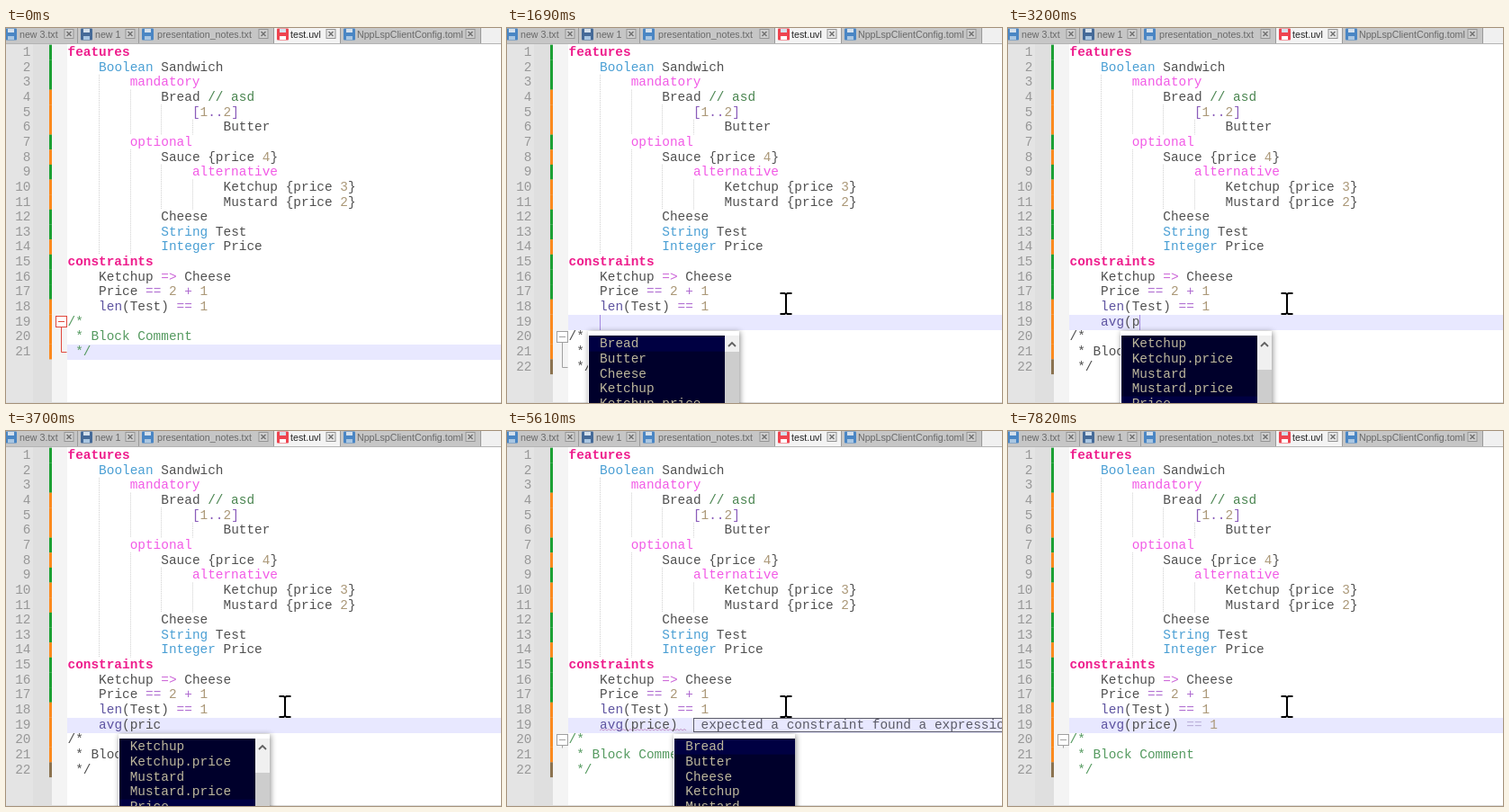
An HTML page for the animation above (8 s loop, 550 by 417 pixels).

```html
<!DOCTYPE html>
<html lang="en">
<head>
<meta charset="utf-8">
<title>Editor</title>
<style>
  html, body { margin: 0; width: 100%; height: 100%; overflow: hidden; background: #fff; }
  svg { display: block; width: 550px; height: 417px; }
  text { font: 14.42px "Liberation Mono", "Courier New", monospace; white-space: pre; }
  text.bold { font-weight: bold; }
  text.tab { font: 10.67px "Liberation Sans", Arial, sans-serif; }
  .popup { filter: drop-shadow(1px 1px 3px rgba(0, 0, 0, .45)); }
</style>
</head>
<body>
<svg id="stage" viewBox="0 0 550 417">
  <g id="base"></g>
  <g id="live"></g>
  <g id="mouse">
    <path d="M303.5 295h5l1.5 1.2 1.5-1.2h5M303.5 318h5l1.5-1.2 1.5 1.2h5M310 296v21" fill="none" stroke="#000" stroke-width="2"/>
  </g>
</svg>
<script>
const LOOP = 8000, CW = 8.65, LH = 16.65, LEFT = 68.5, TOP = 18.7;
const colX = c => LEFT + c * CW;
const rowY = n => TOP + (n - 1) * LH;
const rowTop = n => Math.ceil(rowY(n));

const rect = (x, y, w, h, fill, extra = '') =>
  `<rect x="${x}" y="${y}" width="${w}" height="${h}" fill="${fill}" ${extra}/>`;
const path = (d, stroke, w = 1) => `<path d="${d}" fill="none" stroke="${stroke}" stroke-width="${w}"/>`;
const text = (x, y, s, fill, extra = '') =>
  `<text x="${x}" y="${y}" fill="${fill}" ${extra}>${s.replace(/&/g, '&amp;').replace(/</g, '&lt;')}</text>`;

// Syntax rules: pattern, colour, bold
const PLAIN = '#505050';
const RULES = [
  [/^\/\/.*/, '#4a8550'],
  [/^(features|constraints)/, '#ee1c8c', true],
  [/^(Boolean|String|Integer)/, '#4a9fd4'],
  [/^(mandatory|optional|alternative)/, '#f25ae6'],
  [/^(len|avg)/, '#5e54a0'],
  [/^=>/, '#cc66d8'],
  [/^(==|\+)/, '#ae6ad0'],
  [/^(\[|\]|\.\.)/, '#8a5cba'],
  [/^\d+/, '#ab9878'],
  [/^(\w+|\s+|.)/, PLAIN]
];

function codeLine(n, src, equals) {
  let col = 0, out = '';
  while (col < src.length) {
    const rest = src.slice(col);
    const [re, fill, bold] = RULES.find(r => r[0].test(rest));
    const word = rest.match(re)[0];
    if (word.trim()) {
      const color = word === '==' && equals ? equals : fill;
      out += text(colX(col), rowY(n) + 12.3, word, color, bold ? 'class="bold"' : '');
    }
    col += word.length;
  }
  return out;
}

const CODE = `features
    Boolean Sandwich
        mandatory
            Bread // asd
                [1..2]
                    Butter
        optional
            Sauce {price 4}
                alternative
                    Ketchup {price 3}
                    Mustard {price 2}
            Cheese
            String Test
            Integer Price
constraints
    Ketchup => Cheese
    Price == 2 + 1
    len(Test) == 1`.split('\n');
const COMMENT = ['/*', ' * Block Comment', ' */'];

// Tabs: left edge, width, label x, label, icon colour, close x
const TABS = [
  [-4, 83, 15, 'new 3.txt', '#4a86c4', 70],
  [80, 67, 99, 'new 1', '#456a98', 138],
  [148, 149, 168, 'presentation_notes.txt', '#4a86c4', 286],
  [298, 73, 316, 'test.uvl', '#ee4450', 361],
  [372, 155, 390, 'NppLspClientConfig.toml', '#4a86c4', 516]
];

function tab([x, w, tx, label, color, cx]) {
  const on = label === 'test.uvl', ix = x + 3;
  return rect(x, 0, w, 17, on ? '#f3f3f3' : '#c6c6c6') +
    rect(x + w, 0, 1, 17, '#9a9a9a') +
    rect(ix, 0.5, 13, 13, color, 'rx="1"') + rect(ix + 3, 1, 7, 4, '#d4e0ec') +
    rect(ix + 3, 9, 7, 4, on ? '#fff' : '#a9c6e2') +
    text(tx, 11, label, on ? '#222' : '#686868', 'class="tab"') +
    rect(cx - 5, 1.5, 10, 10, on ? '#e8e8e8' : '#d0d0d0', 'stroke="#949494"') +
    path(`M${cx - 2.5} 4l5 5m0 -5l-5 5`, '#727272', 1.5);
}

// Indent guides: column, first line, last line
const GUIDES = [[4, 3, 14], [8, 4, 6], [8, 8, 14], [12, 5, 6], [12, 9, 11], [16, 6, 6], [16, 10, 11]];
const MARKS = 'gggooogogooggogggo';
const GREEN = '#1ca035', ORANGE = '#fb8a1e', OLIVE = '#8b7350';
const mark = (n, color) => rect(48, rowY(n), 3, LH + 0.1, color);
const lineNo = n => text(27.5, rowY(n) + 12.3, String(n), '#989898', 'text-anchor="end"');

function drawBase() {
  let s = rect(0, 0, 550, 417, '#fff') + rect(0, 0, 550, 17, '#f0f0f0');
  s += TABS.map(tab).join('') + rect(0, 17, 550, 1, '#b4b4b4');
  s += rect(0, 18, 30, 399, '#e4e4e4') + rect(30, 18, 21, 399, '#dfdfdf') + rect(51, 18, 17, 399, '#f4f4f4');
  for (const [c, a, b] of GUIDES) {
    const x = Math.round(colX(c)) + 0.5;
    s += `<path d="M${x} ${rowY(a)}V${rowY(b + 1)}" stroke="#d0d0d0" stroke-dasharray="1 1"/>`;
  }
  CODE.forEach((_, i) => s += lineNo(i + 1) + mark(i + 1, MARKS[i] === 'g' ? GREEN : ORANGE));
  return s + rect(0, 416, 550, 1, '#dcdcdc');
}

const UNRES = 'unresolved reference';
const EXPECT = 'expected a constraint found a expression';
const MISSING = 'missing lhs or rhs expression';
const WORDS = ['Bread', 'Butter', 'Cheese', 'Ketchup', 'Ketchup.price', 'Mustard', 'Mustard.price', 'Price'];
const NAMES = WORDS.filter(w => !w.includes('.'));

// Each step changes part of the state; fold: 0 none, 1 box, 2 box with line; dull: uncoloured comment
const STEPS = [
  [0, { row: 21, typed: null, note: '', wave: 0, caret: 0, fold: 2, red: 1, dull: 0, list: null }],
  [880, { row: 18, caret: 1, red: 0 }],
  [1490, { caret: 0 }],
  [1690, { row: 19, typed: '', caret: 1, dull: 1, list: { col: 4, from: 0 } }],
  [2090, { typed: 'a', list: null, fold: 1, dull: 0 }],
  [2190, { typed: 'av' }],
  [2290, { note: UNRES, wave: 1 }],
  [2490, { typed: 'avg' }],
  [2800, { typed: 'avg(', fold: 0, dull: 1 }],
  [2900, { note: '', wave: 0, list: { col: 8, from: 0 } }],
  [3200, { typed: 'avg(p', list: { col: 8, from: 3 } }],
  [3300, { typed: 'avg(pr' }],
  [3500, { typed: 'avg(pri' }],
  [3700, { typed: 'avg(pric', caret: 0 }],
  [3900, { typed: 'avg(price', caret: 1 }],
  [4410, { typed: 'avg(price)', list: null, fold: 2, dull: 0 }],
  [4610, { note: EXPECT, wave: 1 }],
  [5010, { typed: 'avg(price) ', fold: 1 }],
  [5110, { list: { col: 15, short: 1 } }],
  [5610, { caret: 0 }],
  [5710, { typed: 'avg(price) =', caret: 1, list: null }],
  [5820, { typed: 'avg(price) ==', list: { col: 17, short: 1 } }],
  [5920, { note: MISSING }],
  [6520, { list: null, caret: 0 }],
  [6620, { typed: 'avg(price) == ', caret: 1 }],
  [7120, { typed: 'avg(price) == 1' }],
  [7220, { note: '', wave: 0 }],
  [7820, { caret: 0 }]
];
let acc = {};
const STATES = STEPS.map(([at, change]) => (acc = { ...acc, ...change, at }));

function popup({ col, from = 0, short }) {
  const x = Math.round(colX(col) - 13), w = short ? 135 : 168, inner = short ? w - 1 : 151;
  const chosen = from ? 4 : 0;
  let s = rect(x, 337, w, 90, '#fff', 'class="popup"') + rect(x + 1, 342, inner, 75, '#00002b') +
    rect(x + 1, 343 + chosen * LH, inner, LH, '#000042');
  (short ? NAMES : WORDS).slice(from, from + 5).forEach((w, i) =>
    s += text(colX(col), 355.3 + i * LH, w, '#bdb79c'));
  if (short) return s;
  const bar = x + 152, top = from ? 380 : 360;
  return s + rect(bar, 342, 16, 75, '#f0f0f0') + rect(bar, top, 16, 417 - top, '#cdcdcd') +
    path(`M${bar + 4} 354l4 -4 4 4`, '#606060', 1.8);
}

function foldMark(n, s) {
  if (!s.fold) return '';
  const y = Math.round(rowY(n)) + 2.5, color = s.red ? '#e0483c' : '#a0a0a0';
  const tail = s.fold === 2 ? `M61.5 ${y + 12}V${y + 40}h6` : `M61.5 ${y + 12}v3`;
  return rect(55.5, y, 12, 12, '#fff', `stroke="${color}"`) + path(`M58 ${y + 6}h7${tail}`, color);
}

function note(end, msg) {
  const x = colX(end + 2);
  return rect(Math.round(x - CW) + 0.5, 319.5, Math.round(msg.length * CW + 13.5), 15, '#e8e8ff', 'stroke="#5c5c68"') +
    text(x, rowY(19) + 12.3, msg, '#5a5a66');
}

function wave(cols) {
  let d = `M${colX(4)} 333`;
  for (let i = 0; i < cols * CW / 4; i++) d += 'l2 -1.5l2 1.5';
  return path(d, '#c08cc4', 0.9);
}

function drawLive(s) {
  const added = s.typed !== null, first = added ? 20 : 19;
  let out = rect(68, rowTop(s.row), 482, 17, '#e8e8ff');
  out += CODE.map((l, i) => codeLine(i + 1, l)).join('');
  for (let n = 19; n < first + 3; n++) out += lineNo(n) + mark(n, n === 22 ? OLIVE : ORANGE);
  COMMENT.forEach((c, i) => out += text(LEFT, rowY(first + i) + 12.3, c, s.dull ? PLAIN : '#559a60'));
  out += foldMark(first, s);
  const end = 4 + (s.typed || '').length;
  if (added) {
    if (s.wave) out += wave(end - 4);
    out += codeLine(19, '    ' + s.typed, '#b9aed8');
    if (s.note) out += note(end, s.note);
  }
  if (s.caret) out += rect(Math.round(colX(s.row === 18 ? 18 : end)), rowTop(s.row), 1, 17, '#a48ae0');
  return out + (s.list ? popup(s.list) : '');
}

// Pointer glides in from the right in held steps
function movePointer(t) {
  const k = Math.min(9, Math.floor(t / 98)), p = k / 9;
  const left = Math.pow(1 - p, 2);
  let x = 255 * left, y = 78 * left;
  if (t < 100) x = 400;
  if (t >= 980) x = y = 0;
  mouse.setAttribute('transform', `translate(${x.toFixed(1)} ${y.toFixed(1)})`);
}

const live = document.getElementById('live'), mouse = document.getElementById('mouse');
document.getElementById('base').innerHTML = drawBase();
let shown = null;

function frame() {
  const t = performance.now() % LOOP;
  const state = STATES.findLast(s => s.at <= t);
  if (state !== shown) {
    live.innerHTML = drawLive(state);
    shown = state;
  }
  movePointer(t);
  requestAnimationFrame(frame);
}
frame();
</script>
</body>
</html>
```
